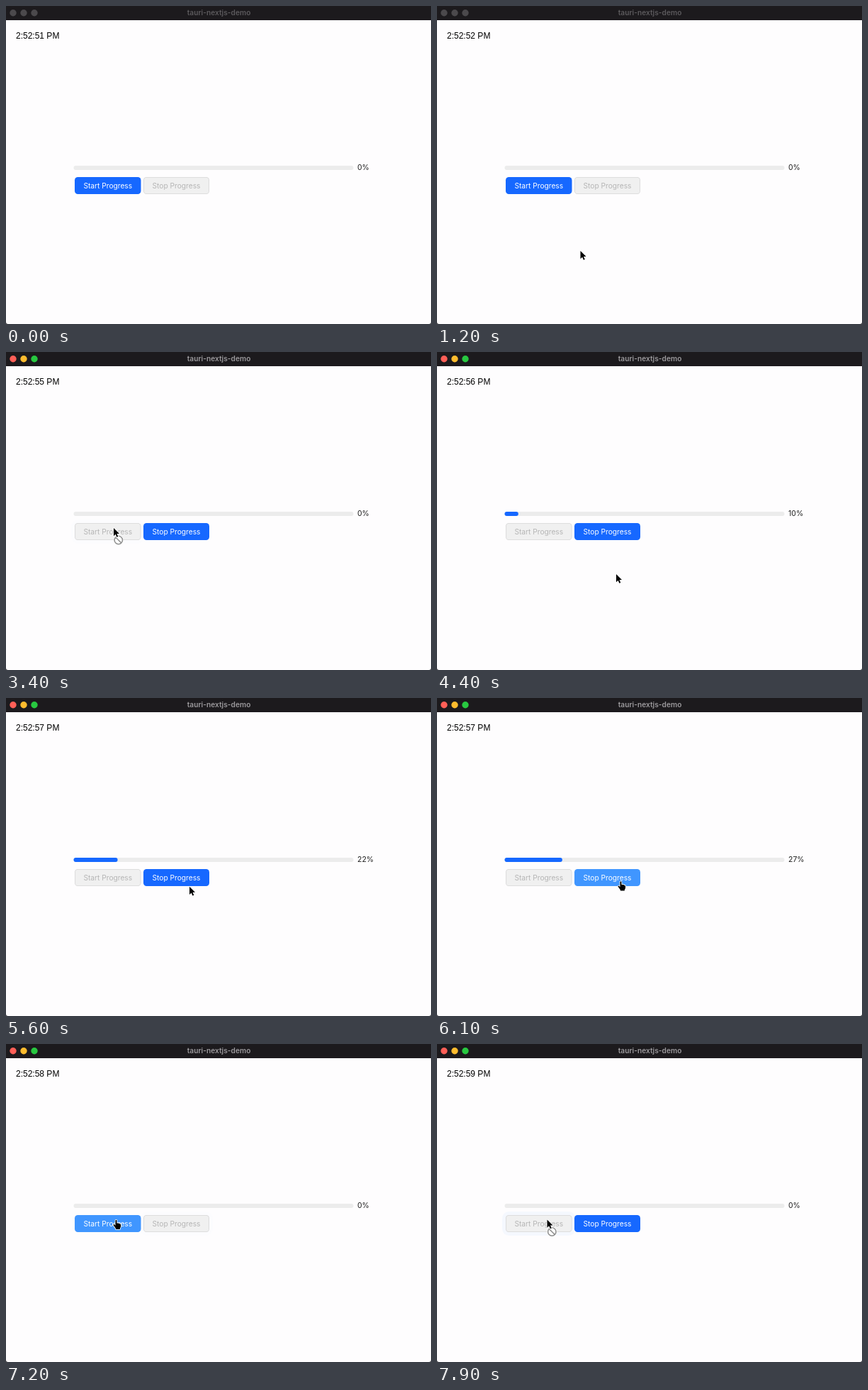
These frames come from a looping animation (600x448 px, 8 s). An HTML page with a canvas:

```html
<!DOCTYPE html>
<html lang="en">
<head>
<meta charset="utf-8">
<title>Progress demo</title>
<style>
  html, body { margin: 0; width: 100%; height: 100%; overflow: hidden; background: #fefdfe; }
  canvas { display: block; width: 600px; height: 448px; }
</style>
</head>
<body>
<canvas id="stage" width="600" height="448"></canvas>
<script>
const ctx = document.getElementById('stage').getContext('2d');

const LOOP = 8000, STEP = 100;
const FOCUS_AT = 1900;
const START_AT = 2290, STOP_AT = 6124, RESTART_AT = 7400;
const COUNT_FROM = 3400;
const BLUE = [22, 104, 255], HOVER = [64, 150, 255], GREY = [240, 240, 240];
const WHITE = [255, 255, 255], DIM_TEXT = [181, 181, 181], DIM_EDGE = [215, 215, 215];
const UI = 'Inter, "Open Sans", sans-serif';

const START = { label: 'Start Progress', x: 97, y: 241, w: 93.5, h: 24, clicks: [START_AT, RESTART_AT] };
const STOP = { label: 'Stop Progress', x: 194, y: 241, w: 93, h: 24, clicks: [STOP_AT] };

// time, x, y of the pointer tip
const PATH = [
  [400, 311, 425], [700, 215, 369], [1000, 215, 369], [1700, 152, 248],
  [3450, 152, 248], [4200, 253, 313], [5340, 253, 313], [5680, 260, 258],
  [6450, 259, 258], [6700, 247, 276], [7200, 155.5, 247.5]
];

const clamp = v => Math.min(1, Math.max(0, v));
const smooth = v => v * v * (3 - 2 * v);
const mix = (a, b, k) => a + (b - a) * k;
const mixColor = (a, b, k) => a.map((v, i) => mix(v, b[i], k));
const rgb = c => `rgb(${c.map(Math.round).join(',')})`;

function bezier(x1, y1, x2, y2) {
  const at = (a, b, s) => 3 * a * s * (1 - s) ** 2 + 3 * b * s * s * (1 - s) + s ** 3;
  return x => {
    if (x <= 0 || x >= 1) return clamp(x);
    let lo = 0, hi = 1;
    for (let i = 0; i < 24; i++) {
      const mid = (lo + hi) / 2;
      if (at(x1, x2, mid) < x) lo = mid; else hi = mid;
    }
    return at(y1, y2, lo);
  };
}
const easeInOut = bezier(0.645, 0.045, 0.355, 1);
const easeInOutCirc = bezier(0.78, 0.14, 0.15, 0.86);
const easeOutCirc = bezier(0.08, 0.82, 0.17, 1);

function pointerAt(t) {
  if (t < PATH[0][0]) return null;
  const next = PATH.findIndex(p => p[0] > t);
  if (next < 0) return PATH[PATH.length - 1].slice(1);
  const a = PATH[next - 1], b = PATH[next];
  const k = smooth((t - a[0]) / (b[0] - a[0]));
  return [mix(a[1], b[1], k), mix(a[2], b[2], k)];
}

const isRunning = t => (t >= START_AT && t < STOP_AT) || t >= RESTART_AT;
const isEnabled = (button, t) => (button === START) !== isRunning(t);

function isOver(button, t) {
  const p = pointerAt(t);
  return p && p[0] > button.x && p[0] < button.x + button.w &&
    p[1] > button.y && p[1] < button.y + button.h - 0.5;
}

// How far the buttons have faded from idle (0) to running (1)
function runningFade(t) {
  const fade = from => easeInOut(clamp((t - from) / 200));
  return fade(START_AT) - fade(STOP_AT) + fade(RESTART_AT);
}

function hoverFade(button, t) {
  if (t < START_AT || !isEnabled(button, t)) return 0;
  let since = 0;
  while (since < 200 && isOver(button, t - since)) since += 20;
  return easeInOut(since / 200);
}

const percentAt = t => t < STOP_AT ? Math.max(0, Math.floor((t - COUNT_FROM) / 100)) : 0;

// The bar trails the counter, then collapses when stopped
function barAt(t) {
  const lag = 0.65;
  const trail = s => 10 * (s - lag * (1 - Math.exp(-s / lag)));
  const seconds = Math.max(0, Math.min(t, STOP_AT) - COUNT_FROM) / 1000;
  return trail(seconds) * (1 - easeInOutCirc(clamp((t - STOP_AT) / 300)));
}

function pill(x, y, w, h, r, fill) {
  ctx.beginPath();
  ctx.roundRect(x, y, w, h, r);
  ctx.fillStyle = fill;
  ctx.fill();
}

function disc(x, y, r, fill) {
  ctx.beginPath();
  ctx.arc(x, y, r, 0, Math.PI * 2);
  ctx.fillStyle = fill;
  ctx.fill();
}

function label(text, x, y, font, fill, align = 'left') {
  ctx.font = font;
  ctx.fillStyle = fill;
  ctx.textAlign = align;
  ctx.fillText(text, x, y);
}

function drawTitleBar(t) {
  const focused = t >= FOCUS_AT;
  ctx.fillStyle = '#1c1a1d';
  ctx.fillRect(0, 0, 600, 20);
  ['#ff5f57', '#febc2e', '#28c840'].forEach((color, i) =>
    disc(10 + 15 * i, 9.7, 4.7, focused ? color : '#4b494c'));
  label('tauri-nextjs-demo', 300.5, 13, `600 10.2px ${UI}`, focused ? '#9c9a9d' : '#5c5a5d', 'center');
}

function drawCorners() {
  ctx.fillStyle = '#3a383b';
  for (const [x, dir] of [[0, 1], [600, -1]]) {
    ctx.beginPath();
    ctx.moveTo(x, 445);
    ctx.quadraticCurveTo(x, 448, x + 3 * dir, 448);
    ctx.lineTo(x, 448);
    ctx.fill();
  }
}

function drawWave(button, t) {
  for (const click of button.clicks) {
    const age = t - click;
    if (age < 0 || age > 2000) continue;
    const spread = 5 * easeOutCirc(clamp(age / 400));
    const alpha = 0.22 * (1 - easeOutCirc(age / 2000));
    pill(button.x - spread, button.y - spread, button.w + 2 * spread, button.h + 2 * spread,
      4.5 + spread, `rgba(22,104,255,${alpha})`);
  }
}

function drawButton(button, t) {
  const { x, y, w, h } = button;
  const fade = runningFade(t);
  const on = button === START ? 1 - fade : fade;
  const active = mixColor(BLUE, HOVER, hoverFade(button, t));
  drawWave(button, t);
  pill(x, y, w, h, 4.5, rgb(mixColor(DIM_EDGE, active, on)));
  pill(x + 0.8, y + 0.8, w - 1.6, h - 1.6, 3.8, rgb(mixColor(GREY, active, on)));
  label(button.label, x + w / 2, y + 15.8, `10.2px ${UI}`, rgb(mixColor(DIM_TEXT, WHITE, on)), 'center');
}

function drawProgress(t) {
  pill(95.5, 225, 395, 6, 3, '#ececec');
  const width = 395 * barAt(t) / 100;
  if (width > 0.2) pill(95.5, 225, width, 6, Math.min(3, width / 2), rgb(BLUE));
  label(percentAt(t) + '%', 496, 231.3, `10.5px ${UI}`, '#1d1d1d');
}

function outlined(path) {
  ctx.lineJoin = 'round';
  ctx.lineWidth = 1.6;
  ctx.strokeStyle = '#fff';
  ctx.fillStyle = '#000';
  ctx.stroke(path);
  ctx.fill(path);
}
const ARROW = new Path2D('M0 0V11.2L2.6 8.8L4.4 12.8L6.3 12L4.5 8.1H8Z');
const HAND = new Path2D('M-1 1Q0 -.6 1 1V5Q2.3 4.2 3 5.3Q4.3 4.6 5 6Q6.4 5.6 6.6 7V9.5Q6.3 11 5.4 12V13.5H-.6V12.3L-4 7.6Q-3.6 6 -2.2 7L-1 8.2Z');

function drawForbidden(x, y) {
  disc(x, y, 7.2, 'rgba(255,255,255,.9)');
  const mark = new Path2D();
  mark.arc(x, y, 5.7, 0, Math.PI * 2);
  mark.moveTo(x - 4, y - 4);
  mark.lineTo(x + 4, y + 4);
  ctx.lineWidth = 1.6;
  ctx.strokeStyle = '#909090';
  ctx.stroke(mark);
}

function drawPointer(t) {
  const tip = pointerAt(t);
  if (!tip) return;
  const target = t >= START_AT && [START, STOP].find(b => isOver(b, t));
  const clickable = target && isEnabled(target, t);
  ctx.save();
  ctx.translate(tip[0], tip[1]);
  if (target && !clickable) drawForbidden(6.8, 17);
  outlined(clickable ? HAND : ARROW);
  ctx.restore();
}

function draw(t) {
  ctx.fillStyle = '#fefdfe';
  ctx.fillRect(0, 0, 600, 448);
  drawTitleBar(t);
  drawCorners();
  const second = 51 + Math.floor((t + 700) / 1000);
  label(`2:52:${second} PM`, 14, 46, '12px "Liberation Sans", Arial, sans-serif', '#000');
  drawProgress(t);
  drawButton(START, t);
  drawButton(STOP, t);
  drawPointer(t);
}

const begin = performance.now();
function tick() {
  const t = (performance.now() - begin) % LOOP;
  draw(Math.floor(t / STEP) * STEP);
  requestAnimationFrame(tick);
}
tick();
</script>
</body>
</html>
```
